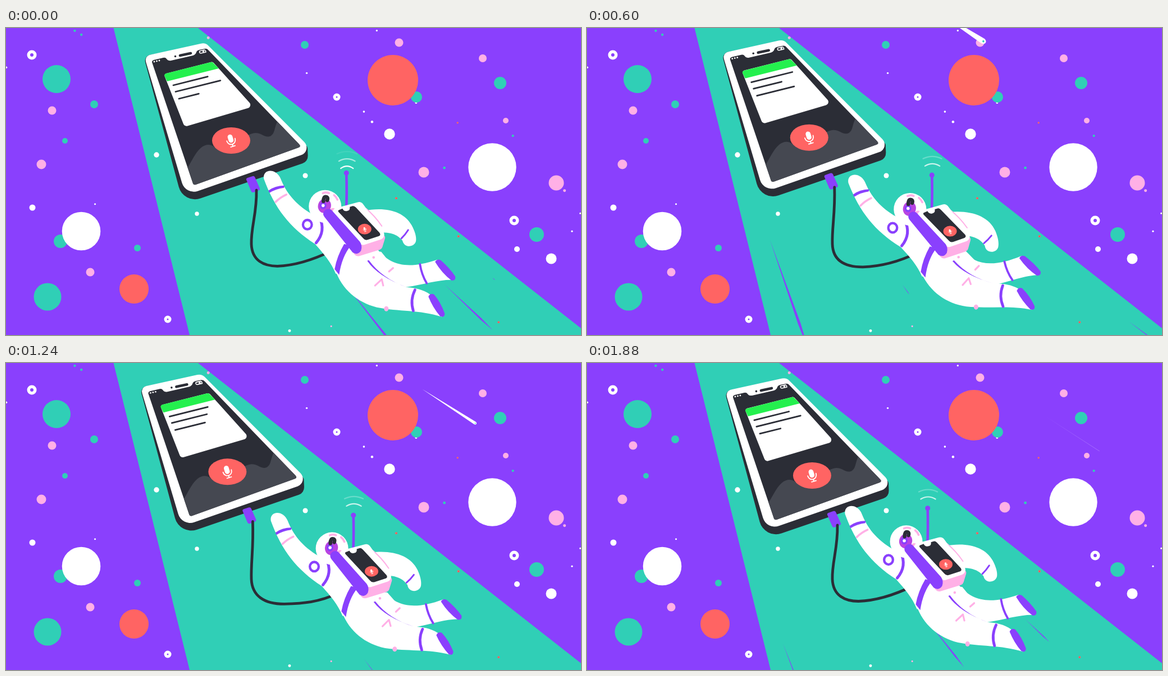
These frames come from a looping animation (1024 by 547 pixels, 1920 ms). An HTML page with a canvas:

```html
<!DOCTYPE html>
<html lang="en">
<head>
<meta charset="utf-8">
<title>Astronaut call</title>
<style>
html, body { margin: 0; width: 100%; height: 100%; overflow: hidden; background: #8a40fd; }
canvas { display: block; width: 100vw; height: 100vh; }
</style>
</head>
<body>
<canvas id="stage"></canvas>
<script>
const W = 1024, H = 547, LOOP = 1920, STEP = 40, TAU = Math.PI * 2;
const PURPLE = '#8a40fd', TEAL = '#30cfb6', DARK = '#2b2d36', GRAY = '#454851',
  WHITE = '#fff', RED = '#ff6463', PINK = '#ffb0e6', GREEN = '#24f04e', MAGENTA = '#b944e2';

const canvas = document.getElementById('stage');
const ctx = canvas.getContext('2d');
const dpr = window.devicePixelRatio || 1;
canvas.width = W * dpr;
canvas.height = H * dpr;

// Rises from 0 to 1 and back, a whole number of times per loop.
const sway = (t, lag, times = 1) => (1 - Math.cos((t - lag) / LOOP * times * TAU)) / 2;

function seeded(seed) {
  return () => {
    seed = (seed * 16807) % 2147483647;
    return seed / 2147483647;
  };
}

// Drawing helpers
function fill(color, d) {
  ctx.fillStyle = color;
  ctx.fill(new Path2D(d));
}
function line(color, width, d) {
  ctx.strokeStyle = color;
  ctx.lineWidth = width;
  ctx.stroke(new Path2D(d));
}
function oval(color, x, y, rx, ry = rx, turn = 0) {
  ctx.fillStyle = color;
  ctx.beginPath();
  ctx.ellipse(x, y, rx, ry, turn, 0, TAU);
  ctx.fill();
}
// Corners are [x, y, radius].
function rounded(color, corners) {
  const n = corners.length, [a, b] = [corners[n - 1], corners[0]];
  ctx.beginPath();
  ctx.moveTo((a[0] + b[0]) / 2, (a[1] + b[1]) / 2);
  corners.forEach(([x, y, r], i) => {
    const next = corners[(i + 1) % n];
    ctx.arcTo(x, y, next[0], next[1], r);
  });
  ctx.closePath();
  ctx.fillStyle = color;
  ctx.fill();
}
function turned(px, py, angle, draw) {
  ctx.save();
  ctx.translate(px, py);
  ctx.rotate(angle);
  ctx.translate(-px, -py);
  draw();
  ctx.restore();
}
function shifted(dx, dy, draw) {
  ctx.save();
  ctx.translate(dx, dy);
  draw();
  ctx.restore();
}
function mic(x, y, scale) {
  ctx.save();
  ctx.translate(x, y);
  ctx.rotate(-0.3);
  ctx.scale(scale, scale);
  line(WHITE, 8.5, 'M0,-5 V1');
  line(WHITE, 1.8, 'M-7.5,0 C-7.5,11 7.5,11 7.5,0 M0,8.5 V12 M-4,12 H4');
  ctx.restore();
}

// Planets and larger dots, by colour
const planets = {
  [TEAL]: [[90,91,25],[74,479,24.5],[945,368,13],[97,380,12],[880,98,11],[731,123,10],
    [157,136,7],[532,30,7],[234,392,6],[105,201,5]],
  [PINK]: [[980,276,13.5],[744,257,9.5],[63,243,8.5],[82,147,7.5],[150,435,7.5],[700,26,7.5],
    [849,54,7],[890,165,5]],
  [WHITE]: [[866,248,42.7],[134,362,34.3],[683,189,9.7],[971,411,9.5],[47,320,5.5],[910,394,5],
    [268,226,4.7],[533,263,4.5],[340,331,3.7]],
  [RED]: [[689,93,45],[228,465,26]]
};
const rings = [[46,48,8.5],[905,343,8.5],[589,123,6.5],[288,519,6.5]];

function drawSpace() {
  ctx.fillStyle = PURPLE;
  ctx.fillRect(0, 0, W, H);
  fill(TEAL, 'M191.5,0 H342 L1024,535 V547 H327Z');
  const random = seeded(77), tints = [WHITE, TEAL, WHITE, PINK, WHITE, RED];
  for (let i = 0; i < 30; i++)
    oval(tints[i % tints.length], random() * W, random() * H, 1.5 + random());
  for (const color in planets)
    for (const [x, y, r] of planets[color]) oval(color, x, y, r);
  for (const [x, y, r] of rings) {
    oval(WHITE, x, y, r);
    oval(PURPLE, x, y, (r - 4.5) * 0.75);
  }
}

// Speed lines fan out across the beam: x, y, then start times.
const streaks = [
  [326, 378, 460], [349, 500, 230, 1730], [402, 424, 180, 1325], [429, 350, 930],
  [562, 458, 586], [586, 459, 1073], [607, 460, 247, 1810], [781, 457, 1500, 1841],
  [866, 445, 1565, 1916], [965, 523, 520, 1657]
];
function drawStreaks(t) {
  for (const [x, y, ...starts] of streaks) {
    const lean = x * 0.00155 - 0.155;
    for (const start of starts) {
      const age = (t - start + LOOP) % LOOP;
      if (age >= 190) continue;
      const tip = age * 1.5;
      const tail = tip * Math.max(0, (age - 155) / 35);
      const mid = tail + (tip - tail) * 0.75;
      const half = Math.min(2.4, 0.3 + tip * 0.011);
      ctx.save();
      ctx.translate(x, y);
      ctx.rotate(Math.atan2(1, lean));
      fill(PURPLE, `M${tail},0 L${mid},${-half} L${tip},0 L${mid},${half}Z`);
      ctx.restore();
    }
  }
}

function drawComet(t) {
  const s = (t - 100) / 1820;
  if (s <= 0) return;
  const x = 665 + 124 * (1 - Math.cos(Math.PI * s));
  const y = 27 + (x - 711) * 0.645;
  const r = Math.max(0.4, Math.min(5, 7 * (1 - s)));
  ctx.save();
  ctx.globalAlpha = Math.min(1, (1 - s) * 6 + 0.1);
  ctx.translate(x, y);
  ctx.rotate(Math.atan(0.645));
  fill(WHITE, `M-114,0 L${-r},${-r} C${r * 0.8},${-r} ${r * 0.8},${r} ${-r},${r}Z`);
  if (r > 2.5) oval(TEAL, -r * 0.6, 0, r * 0.35);
  ctx.restore();
}

function drawPhone(swing) {
  rounded(DARK, [[245, 50, 11], [354, 30, 14], [537, 212, 6], [538, 238, 14], [316, 314, 30]]);
  rounded(WHITE, [[246, 50, 10], [355, 26, 14], [547, 219, 14], [320, 298, 22]]);

  const screen = 'M263,57 L280,53 Q284,52 286,55 Q289,59 294,58 L333,49 Q338,47 339,43 Q340,40 344,39'
    + ' L354,37 Q358,36 361,40 L522,207 Q526,211 521,213 L338,279 Q334,280 333,277 L260,61 Q260,58 263,57Z';
  fill(DARK, screen);
  ctx.save();
  ctx.clip(new Path2D(screen));
  fill(GRAY, 'M318,256 C332,240 340,208 361,208 C372,208 376,222 390,219 C410,212 425,188 444,187'
    + ' C456,187 460,196 470,193 C480,189 477,176 485,164 L540,210 L336,290Z');
  ctx.restore();

  oval(DARK, 301.5, 50.5, 1.8);
  line(DARK, 4.6, 'M310,49 L329,45');
  for (let i = 0; i < 3; i++) oval(WHITE, 264 + 4.5 * i, 60 - i, 1.4);
  line(WHITE, 1.6, 'M345,41 L353,39 Q355,39 355.5,41 L356,43 L347,45 Q345,45 344.5,43Z');
  oval(WHITE, 351.5, 41.8, 1.8);

  rounded(WHITE, [[281, 82, 4], [368, 60, 5], [440, 140, 6], [318, 176, 6]]);
  fill(GREEN, 'M285,81 L364,61 Q367,60 369,62 L379,72 L287,95 L282,85 Q282,82 285,81Z');
  const textLine = (x, y, w) => line(DARK, 2.8, `M${x},${y} l${w},${-w / 4}`);
  textLine(298, 102, 61 + 13 * swing);
  textLine(302, 113.5, 80 - 33 * swing);
  textLine(308, 126, 35 + 34 * swing);

  oval(RED, 401, 200.5, 34, 23.5);
  mic(400.5, 199, 1.03);
  rounded(PURPLE, [[427, 268, 3], [442, 263, 4], [453, 288, 3], [438, 294, 4]]);
}

// Hangs between the phone, moved by p, and the astronaut, moved by ax and ay.
function drawCable(p, ax, ay) {
  const low = 424 + ay * 0.4;
  line(DARK, 4.8, `M${446 + p},${289 + p} C${447 + p * 0.9},330 436,355 437,385`
    + ` C438,415 460,${low} ${483 + ax},${low}`
    + ` C${515 + ax},${low - 1} ${545 + ax},${413 + ay} ${580 + ax},${396 + ay}`);
}

function drawSignal(t) {
  const first = (18 * t / LOOP + 0.05) % 1;
  for (let i = 0; i < 3; i++) {
    const rise = 11 + 13 * (first + i);
    const half = 8 + 0.26 * rise, y = 257 - rise;
    ctx.globalAlpha = Math.max(0, Math.min(1, 1 - (rise - 13) / 27));
    line(WHITE, 2.2, `M${607 - half},${y + 4} Q607,${y - 4} ${607 + half},${y + 4}`);
  }
  ctx.globalAlpha = 1;
}

function drawAntenna(t) {
  const tip = 606 + 5.4 * sway(t, 0, 3);
  line(PURPLE, 4.6, `M606,318 Q607,290 ${tip},257.5`);
  oval(PURPLE, tip, 257.5, 4.5);
}

function drawFarArm() {
  fill(WHITE, 'M636,325 C675,317 708,325 722,350 C728,361 731,371 730,378 C728,390 709,392 706,378'
    + ' C700,371 690,362 664,364 L640,350Z');
  line(PURPLE, 3, 'M704,374 Q711,367 716,359');
}

function drawTorso() {
  fill(WHITE, 'M459,268 C456,250 481,248 489,268 C498,291 514,313 545,331 L600,330 L655,400 L600,440'
    + ' L587,437 C579,417 566,402 550,384 C505,355 478,320 459,268Z');
  fill(PURPLE, 'M467,289 Q479,280 496,280 L495,284 Q480,286 469,293Z');
  line(PINK, 3.6, 'M480,309 Q488,301 499,296');
  line(PURPLE, 5, 'M558,336 Q570,361 552,382');
  oval(PURPLE, 536.5, 349.5, 10, 10.5);
  oval(WHITE, 536.5, 349.5, 5.7, 6.2);
}

function drawTopLeg() {
  fill(WHITE, 'M660,392 C684,423 715,430 768,412 L797,448 C770,447 745,456 712,461 C690,470 650,450 640,420Z');
  fill(PURPLE, 'M764,416 Q767,410 774,413 Q790,427 800,442 Q801,450 793,449 Q776,436 764,416Z');
  line(PURPLE, 3.8, 'M737,420 Q740,439 749,454');
}

function drawHips() {
  fill(WHITE, 'M586,430 C598,465 625,488 660,497 C700,505 735,501 776,514 L755,474'
    + ' C742,465 728,462 712,461 L702,440 L668,398 L610,392Z');
  fill(PURPLE, 'M752,478 Q755,471 762,474 Q774,488 781,508 Q781,516 773,513 Q760,498 752,478Z');
  line(PURPLE, 4.8, 'M728,466 Q719,484 725,503');
  fill(PURPLE, 'M643,414 Q662,442 713,461 Q670,446 646,413Z');
  oval(PINK, 654.5, 408, 2.3);
  line(PINK, 3.4, 'M682,433 L689,427');
  line(PINK, 3.2, 'M657,458 L669,447 L671.5,458');
  oval(PINK, 677, 499.5, 4, 4.5);
}

function drawHelmet() {
  oval(WHITE, 568, 317, 29);
  line(PINK, 3.6, 'M564,293.5 Q570,291 575,293.5 M584,297 Q588,300 590,305');
  oval(MAGENTA, 567, 316, 11.5, 13, 0.3);
  oval(PURPLE, 564.5, 315.5, 6, 6.5);
  line(DARK, 6.5, 'M565,308 Q565,299 570,300 Q574,301 572,306');
  oval(WHITE, 564.5, 315.5, 2.8);
}

function drawPack() {
  line(PINK, 2, 'M641,321 Q656,333 669,352');
  rounded(PINK, [[563, 330, 6], [582, 319, 6], [676, 370, 6], [669, 393, 7], [624, 407, 9]]);
  rounded(WHITE, [[576, 323, 7], [632, 308, 9], [679, 372, 9], [633, 387, 9]]);
  fill(PURPLE, 'M566,326 Q571,319 579,323 L630,380 Q635,387 632,396 Q626,405 617,399 L567,336 Q563,331 566,326Z');
  fill(DARK, 'M594,323 L599,321 Q602,327 608,325 Q613,324 612,318 L617,316.5 Q620,315.5 623,319'
    + ' L665,364 Q668,368 664,370 L644,376.5 Q639,378 636,374 L592,327 Q590,324 594,323Z');
  oval(RED, 638.5, 357.5, 12, 9.5);
  mic(638.5, 357.5, 0.38);
}

function drawAstronaut(t, swing) {
  const tilt = -0.01 * (Math.sin(t / LOOP * TAU) + swing);
  drawSignal(t);
  drawAntenna(t);
  turned(638, 357, tilt, () => {
    turned(650, 330, 0.13 * swing, drawFarArm);
    drawTorso();
    turned(602, 470, -0.055 * swing, drawTopLeg);
    turned(602, 428, -0.085 * swing, drawHips);
    fill(PURPLE, 'M602,384 L614,387 Q598,406 593,439 L585,429 Q589,406 602,384Z');
    drawHelmet();
    drawPack();
  });
}

function draw(t) {
  ctx.setTransform(dpr, 0, 0, dpr, 0, 0);
  ctx.lineCap = ctx.lineJoin = 'round';
  const swing = sway(t, 30, 2);
  const drift = -8 * sway(t, 20);
  const ax = 14 * sway(t, 75), ay = 16 * sway(t, 145) - 3 * swing;
  drawSpace();
  drawComet(t);
  drawStreaks(t);
  shifted(drift, drift, () => drawPhone(swing));
  drawCable(drift, ax, ay);
  shifted(ax, ay, () => drawAstronaut(t, swing));
}

const begin = performance.now();
function tick() {
  const t = (performance.now() - begin) % LOOP;
  draw(Math.floor(t / STEP) * STEP);
  requestAnimationFrame(tick);
}
tick();
</script>
</body>
</html>
```
